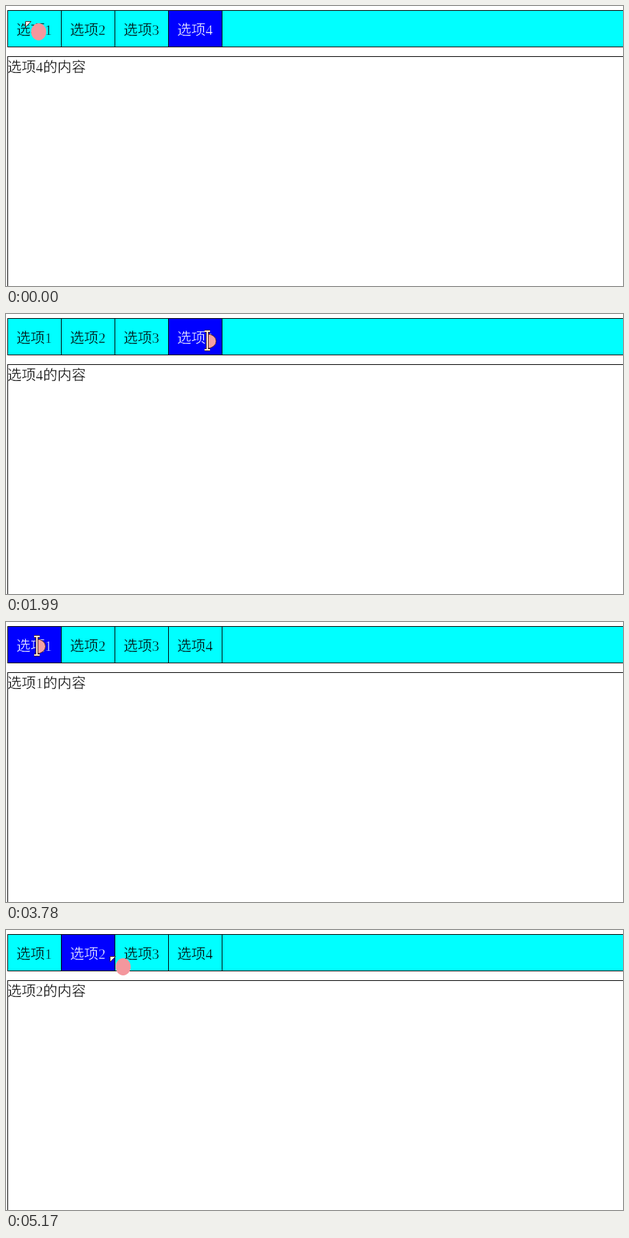
Animation, 898 px wide and 407 px high, one loop 5240 ms. Source, as an HTML page:

```html
<!DOCTYPE html>
<html lang="zh-CN">
<head>
<meta charset="utf-8">
<title>选项卡</title>
<style>
  html, body { margin: 0; width: 100%; height: 100%; overflow: hidden; background: #fff; }
  svg { display: block; width: 898px; height: 407px; }
  /* an outline in the background colour thins the strokes of the letters */
  text {
    font: 100 20.8px "Liberation Serif", "Noto Sans CJK SC", "Noto Sans CJK", serif;
    stroke: #fff; stroke-width: .4px;
  }
</style>
</head>
<body>
<svg viewBox="0 0 898 407">
  <g shape-rendering="crispEdges">
    <rect x="2.5" y="6.5" width="940" height="53" fill="#0ff" stroke="#000"/>
    <rect x="2.5" y="73.5" width="940" height="400" fill="#fff" stroke="#000"/>
  </g>
  <g id="tabs"></g>
  <text id="content" x="2" y="96"></text>
  <g id="cursor">
    <g id="arrow">
      <ellipse cx="19.5" cy="15.5" rx="11" ry="12.5" fill="#f4979d"/>
      <path d="M.5 .5H8.5L.5 8.5Z" fill="#fff4ec" stroke="#4a2424"/>
    </g>
    <g id="beam">
      <path id="peek" fill="#f4a0a4" stroke="#4a2424"/>
      <path d="M-4 -13H4M0 -13V14M-4 14H4" fill="none" stroke="#4a2424" stroke-width="4"/>
      <path d="M-4 -13H4M0 -13V14M-4 14H4" fill="none" stroke="#ffe6d6" stroke-width="2"/>
    </g>
  </g>
</svg>
<script>
  const LOOP = 5240, STEPS = 76, STEP = LOOP / STEPS;
  const LEFT = 2, TAB = 78, TABS = 4;
  const $ = id => document.getElementById(id);

  // [step, x, y]: the pointer clicks here, then sets off for the next stop
  const stops = [
    [0, 28, 22], [12, 62, 34], [18, 98, 36], [24, 200, 36], [28, 298, 38],
    [38, 196, 31], [43, 280, 31], [47, 113, 31], [54, 30, 34], [63, 278, 40],
    [69, 196, 38], [73, 125, 36], [STEPS, 152, 38]
  ];
  const TRAVEL = .75; // share of the gap between clicks spent moving

  function add(name, attrs, parent) {
    const el = document.createElementNS("http://www.w3.org/2000/svg", name);
    for (const key in attrs) el.setAttribute(key, attrs[key]);
    return parent.appendChild(el);
  }

  const tabs = Array.from({ length: TABS }, (_, i) => {
    const x = LEFT + i * TAB, n = i + 1;
    const box = add("rect", { x: x + 1, y: 7, width: TAB - 1, height: 52 }, $("tabs"));
    add("rect", { x: x + TAB, y: 7, width: 1, height: 52 }, $("tabs"));
    const label = add("text", { x: x + 13, y: 42 }, $("tabs"));
    label.textContent = "选项" + n;
    return { n, box, label };
  });

  const tabUnder = x => Math.ceil((x - LEFT) / TAB);

  function overLabel(x, y) {
    const inTab = (x - LEFT) % TAB;
    return tabUnder(x) <= TABS && inTab >= 13 && inTab <= 66 && y >= 24 && y <= 46;
  }

  function pointer(step) {
    const i = stops.findIndex(s => s[0] > step) - 1;
    const [s0, x0, y0] = stops[i], [s1, x1, y1] = stops[i + 1];
    const u = Math.min(1, (step - s0) / (s1 - s0) / TRAVEL), e = u * u * (3 - 2 * u);
    return {
      x: Math.round(x0 + (x1 - x0) * e),
      y: Math.round(y0 + (y1 - y0) * e),
      open: i ? tabUnder(x0) : TABS
    };
  }

  function draw(ms) {
    const step = Math.floor((ms + 16) / STEP) % STEPS;
    const { x, y, open } = pointer(step), beam = overLabel(x, y);
    for (const { n, box, label } of tabs) {
      const back = n === open ? "#00f" : "#0ff";
      box.setAttribute("fill", back);
      label.style.stroke = back;
      label.setAttribute("fill", n === open ? "#fff" : "#000");
    }
    $("content").textContent = `选项${open}的内容`;

    $("cursor").setAttribute("transform", `translate(${x} ${y})`);
    $("arrow").style.display = beam ? "none" : "";
    $("beam").style.display = beam ? "" : "none";
    const reach = 11.5 + 1.5 * Math.sin(step / 2);
    $("peek").setAttribute("d", `M0 -9A${reach} 10.5 0 0 1 0 12Z`);
  }

  const start = performance.now();
  function tick() {
    draw((performance.now() - start) % LOOP);
    requestAnimationFrame(tick);
  }
  tick();
</script>
</body>
</html>
```
